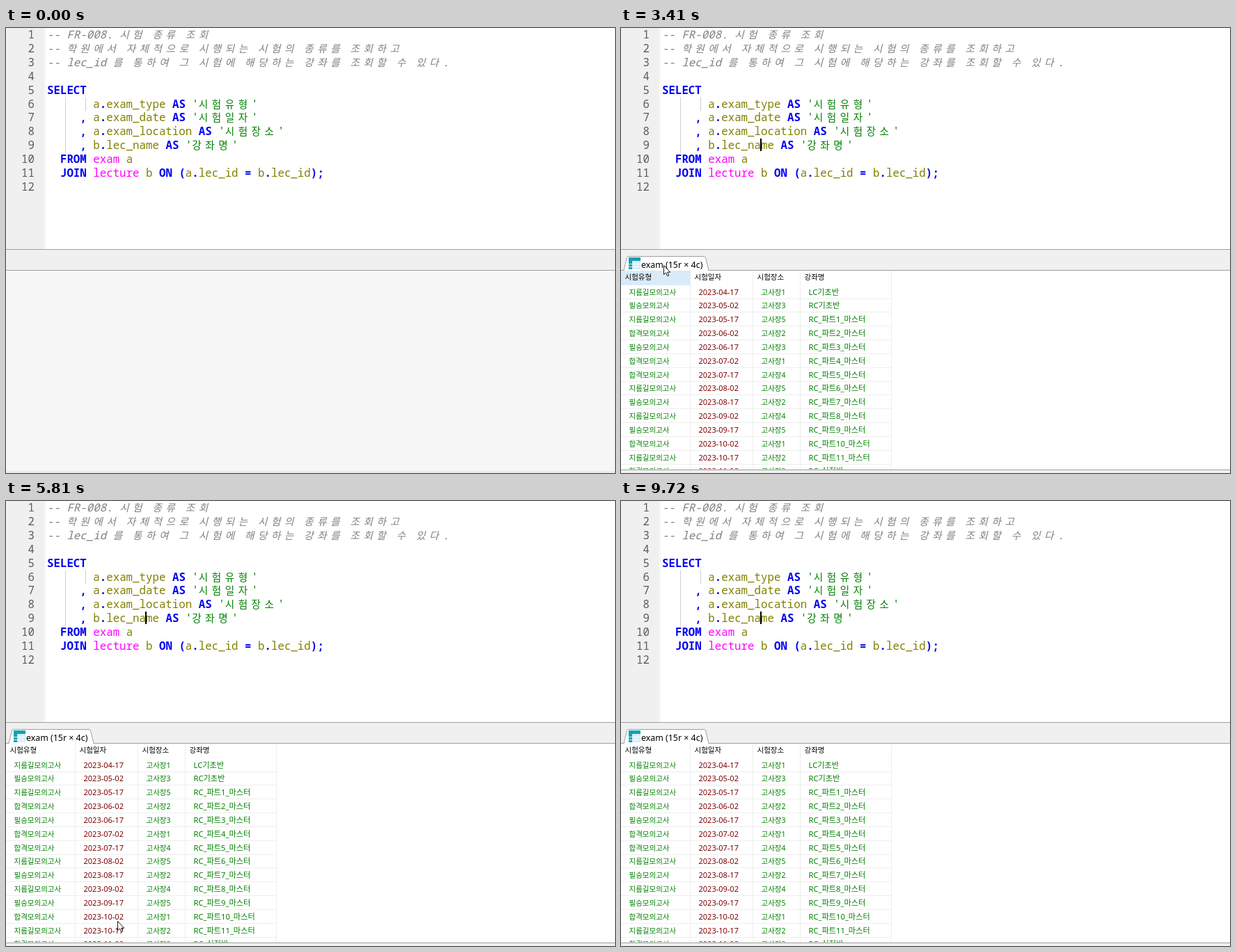
Recreate the animation shown at these times as an HTML page. Size 875 by 640 pixels, loop 9.85 s.

```html
<!DOCTYPE html>
<html lang="ko">
<head>
<meta charset="utf-8">
<title>SQL query</title>
<style>
  html, body { margin: 0; width: 100%; height: 100%; overflow: hidden; background: #fff; }
  svg { display: block; width: 875px; height: 640px; }
  text { white-space: pre; font-family: "Noto Sans", "Noto Sans CJK KR", sans-serif; }
  .code text { font: 15.78px "Noto Sans Mono", "Noto Sans CJK KR", monospace; }
  .code .num { fill: #5c5c5c; text-anchor: end; }
  .code .note { fill: #808080; font-style: italic; font-weight: 500; }
  .code .key, .code .sym { fill: #0000f0; font-weight: 700; }
  .code .name { fill: #808000; }
  .code .table { fill: #ff00ff; }
  .code .str { fill: #008000; }
  .code .han { font: 300 14.6px "Noto Sans CJK KR", "Noto Sans CJK", sans-serif; }
  .code .han.note { font-style: italic; }
  .grid text { font-size: 10.5px; font-weight: 500; fill: #008000; }
  .grid .head { fill: #000; }
  .grid .date { font-size: 11px; fill: #800000; }
  .grid .course { font-size: 11.2px; }
  .hint text { font-size: 13px; fill: #555; }
</style>
</head>
<body>
<svg viewBox="0 0 875 640">
  <rect width="875" height="640" fill="#fff"/>
  <rect width="55" height="318" fill="#f0f0f0"/>
  <path d="M56.5 0V318" stroke="#f0f0f0"/>
  <path d="M85.5 100V179M114.5 100V119" stroke="#a0a0a0" stroke-dasharray="1 1"/>
  <g class="code" id="code"></g>
  <rect y="318" width="875" height="30" fill="#f0f0f0"/>
  <path d="M0 318.5H875M0 348.5H875" stroke="#a0a0a0"/>
  <rect y="349" width="875" height="288" fill="#f7f7f7"/>
  <rect y="637" width="875" height="3" fill="#ebebeb"/>

  <g id="result">
    <rect y="349" width="875" height="286" fill="#fff"/>
    <path d="M4 348.5L8.5 330Q9 328.5 10.5 328.5H119Q121 328.5 121.5 330L126 348.5" fill="#fff" stroke="#a0a0a0"/>
    <rect x="5" y="348" width="120" height="1" fill="#fff"/>
    <rect x="11" y="330" width="17" height="17" fill="#d3ecfa"/>
    <path d="M11 330H28V335H16V347H11Z" fill="#10a3b3"/>
    <path d="M11 339.5H28M11 343.5H28M20 335V347M24 335V347" stroke="#fff" stroke-width=".8"/>
    <text x="29" y="344.5" font-size="12.4">exam (15r × 4c)</text>
    <clipPath id="pane"><rect y="349" width="875" height="285.5"/></clipPath>
    <g id="rules" stroke="#eeeeee"></g>
    <rect id="hot" y="349" height="21" fill="#d9ebf9"/>
    <g class="grid" id="grid" clip-path="url(#pane)"></g>
    <rect y="635" width="875" height="5" fill="#f0f0f0"/>
    <path d="M0 635.5H875" stroke="#a0a0a0"/>
  </g>

  <path id="caret" d="M201 159V177" stroke="#000" stroke-width="2"/>
  <g class="hint" id="hint">
    <path d="M-9 87.5H248Q255.5 87.5 255.5 95V310Q255.5 317.5 248 317.5H72L62 328V317.5H-9Z" fill="#fff" stroke="#b8b8b8"/>
  </g>
  <path id="arrow" d="M.5 .5V13.6L3.5 10.9L5.7 15.8L7.8 14.9L5.7 10.2H9.7Z" fill="#fff" stroke="#000" stroke-width=".9"/>
  <path id="beam" d="M-2.5 -7.5H-.5L.5 -6.5L1.5 -7.5H3.5M.5 -6.5V6.5M-2.5 7.5H-.5L.5 6.5L1.5 7.5H3.5" fill="none" stroke="#000"/>
</svg>
<script>
const LOOP = 9850, STEP = 70, BLINK = 536, COL = 9.47, LINE = 19.86;
const $ = id => document.getElementById(id);

function add(parent, tag, attrs, content = '') {
  const el = document.createElementNS('http://www.w3.org/2000/svg', tag);
  for (const k in attrs) el.setAttribute(k, attrs[k]);
  el.textContent = content;
  $(parent).append(el);
}

const SQL = `-- FR-008. 시험 종류 조회
-- 학원에서 자체적으로 시행되는 시험의 종류를 조회하고
-- lec_id 를 통하여 그 시험에 해당하는 강좌를 조회할 수 있다.

SELECT
       a.exam_type AS '시험유형'
     , a.exam_date AS '시험일자'
     , a.exam_location AS '시험장소'
     , b.lec_name AS '강좌명'
  FROM exam a
  JOIN lecture b ON (a.lec_id = b.lec_id);
`.split('\n');

function kind(token) {
  if (token.startsWith('--')) return 'note';
  if (token[0] === "'") return 'str';
  if (/^(SELECT|AS|FROM|JOIN|ON)$/.test(token)) return 'key';
  if (/^(exam|lecture)$/.test(token)) return 'table';
  return /\w/.test(token) ? 'name' : 'sym';
}

// Hangul takes two columns, everything else one.
SQL.forEach((line, row) => {
  const y = 15.2 + row * LINE;
  add('code', 'text', { x: 41, y, class: 'num' }, row + 1);
  let col = 0;
  for (const token of line.match(/--.*|'.*?'|\w+|\s+|[^\w\s]/g) || []) {
    for (const run of token.match(/[가-힣]|\s+|[^가-힣\s]+/g)) {
      const han = /[가-힣]/.test(run);
      const cls = kind(token) + (han ? ' han' : '');
      if (run.trim()) add('code', 'text', { x: 59 + col * COL, y, class: cls }, run);
      col += han ? 2 : run.length;
    }
  }
});

// Result grid
const EDGES = [0, 100, 190, 258, 389];
const EXAMS = { s: '지름길', w: '필승', p: '합격' };
const types = 'swspwppswswpsp', rooms = '13523145245123';

function course(i) {
  if (i < 2) return 'LR'[i] + 'C기초반';
  return i < 13 ? `RC_파트${i - 1}_마스터` : 'RC_실전반';
}

EDGES.slice(1).forEach(x => add('rules', 'path', { d: `M${x - .5} 349V635` }));
['시험유형', '시험일자', '시험장소', '강좌명'].forEach((name, i) =>
  add('grid', 'text', { x: EDGES[i] + 5.5, y: 362.3, class: 'head' }, name));

for (let i = 0; i < 14; i++) {
  const y = 383.5 + i * 19.84;
  const month = String(4 + (i + 1 >> 1)).padStart(2, 0);
  const cells = [
    ['exam', EXAMS[types[i]] + '모의고사'],
    ['date', `2023-${month}-${i % 2 ? '02' : '17'}`],
    ['room', '고사장' + rooms[i]],
    ['course', course(i)]
  ];
  add('rules', 'path', { d: `M0 ${Math.round(y + 6) - .5}H389` });
  cells.forEach(([cls, value], c) => add('grid', 'text', { x: EDGES[c] + 11.5, y, class: cls }, value));
}

['4 columns × 15 rows', '', ...SQL.slice(0, 11)].forEach((line, i) =>
  add('hint', 'text', { x: -108, y: 104.5 + i * 17.2 }, line.replace(';', '')));

// Pointer stops: arrival time and place, each reached by an eased move.
const TRAVEL = 550, ENTER = 200, LEAVE = 9190;
const stops = [
  { t: 830, x: 199, y: 175 },
  { t: 2700, x: 240, y: 518 },
  { t: 3350, x: 61, y: 341 },
  { t: 3920, x: 67, y: 350 },
  { t: 4850, x: 10, y: 563 }
];
for (let c = 1; c < 4; c++) {
  const t = 4750 + c * 700, x = EDGES[c] + 48;
  stops.push({ t, x, y: 357 }, { t: t + 350, x: x + 12, y: 605 });
}
stops.push({ t: 8000, x: 430, y: 560 }, { t: 8640, x: 522, y: 517 }, { t: LEAVE, x: 885, y: 650 });

const clamp = v => Math.min(1, Math.max(0, v));
const mix = (a, b, f) => Math.round(a + (b - a) * f);
const smooth = p => p * p * (3 - 2 * p);
const backOut = (p, k) => 1 + (k + 1) * (p - 1) ** 3 + k * (p - 1) ** 2;

function pointer(t) {
  const i = stops.findIndex(s => s.t > t);
  if (i === 0) {
    const p = clamp((t - ENTER) / (stops[0].t - ENTER));
    return [mix(702, stops[0].x, backOut(p, .4)), mix(497, stops[0].y, backOut(p, 3.2))];
  }
  const a = stops[i - 1], b = stops[i] || a;
  const start = Math.max(a.t, b.t - TRAVEL);
  const f = b === a ? 1 : smooth(clamp((t - start) / (b.t - start)));
  return [mix(a.x, b.x, f), mix(a.y, b.y, f)];
}

const show = (id, on) => $(id).style.display = on ? '' : 'none';

function draw(t) {
  const s = Math.floor(t / STEP) * STEP;
  const active = t >= ENTER && t < LEAVE, ready = t >= 1480;
  const [x, y] = active ? pointer(s) : [0, 0];
  const editing = y < 318;
  for (const id of ['arrow', 'beam']) $(id).setAttribute('transform', `translate(${x} ${y})`);
  show('arrow', active && !editing);
  show('beam', active && editing);
  show('result', ready);

  const col = EDGES.findIndex((e, i) => x >= e && x < EDGES[i + 1]);
  const hot = active && y >= 340 && y < 370 && col >= 0;
  show('hot', hot);
  if (hot) {
    $('hot').setAttribute('x', EDGES[col]);
    $('hot').setAttribute('width', EDGES[col + 1] - EDGES[col]);
  }

  const lit = Math.floor((t - 9720) / BLINK) % 2 === 0;
  show('caret', t >= 1410 && (t < 1550 || t > 2080 && lit));
  $('hint').style.opacity = clamp((s - 3560) / 140) * clamp((3937 - s) / 140);
}

const begin = performance.now();
function tick() {
  draw((performance.now() - begin) % LOOP);
  requestAnimationFrame(tick);
}
tick();
</script>
</body>
</html>
```
